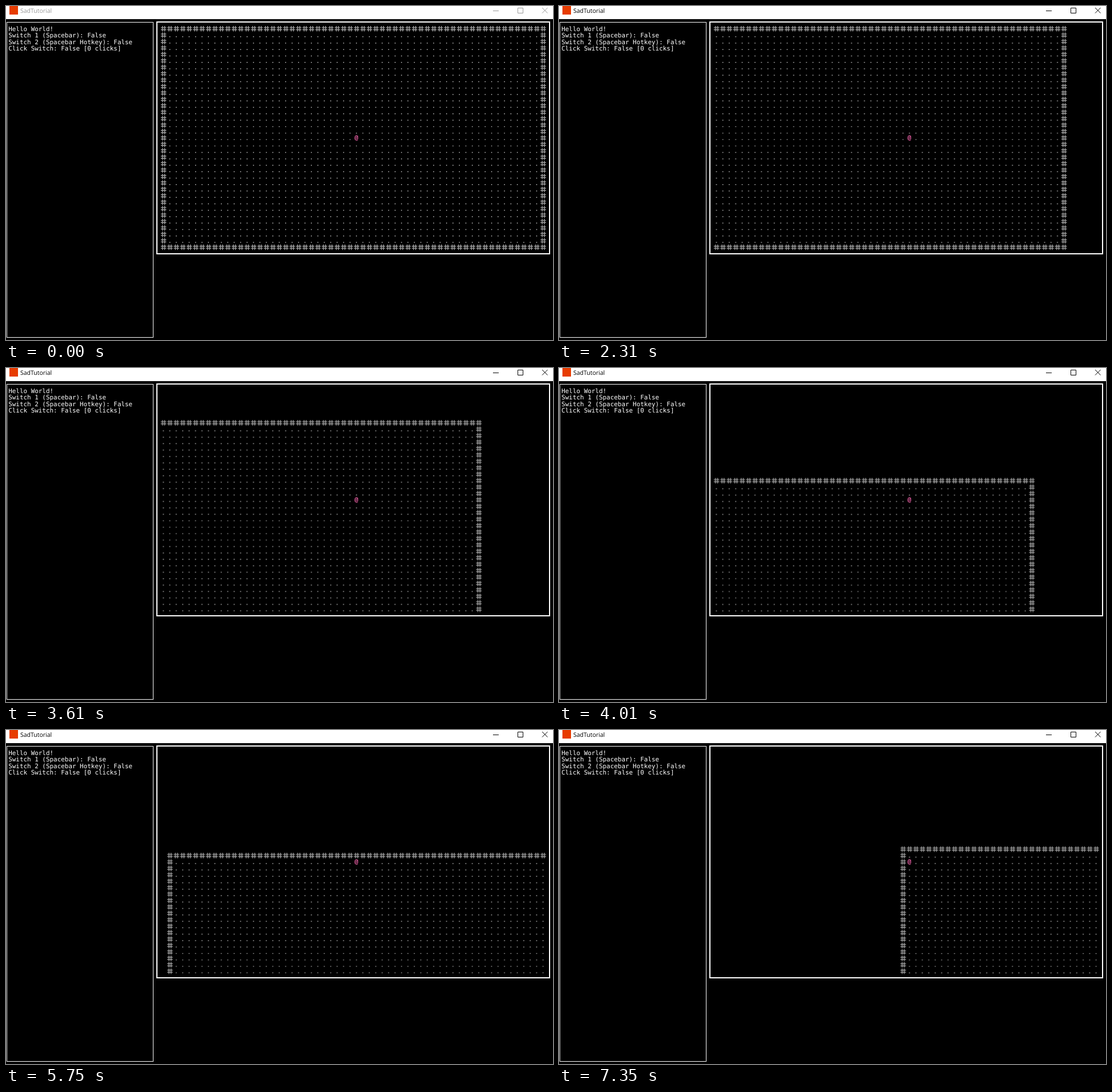
Recreate the animation shown at these times as an HTML page. Size 957 px wide and 585 px high, loop 8 s.

```html
<!DOCTYPE html>
<html lang="en">
<head>
<meta charset="utf-8">
<title>SadTutorial</title>
<style>
html, body { margin: 0; width: 100%; height: 100%; overflow: hidden; background: #000; }
svg { display: block; }
text { text-rendering: geometricPrecision; white-space: pre; }
.title { font: 10.5px "Open Sans", "Noto Sans", sans-serif; }
.log { font: 10.93px "DejaVu Sans Mono", monospace; fill: #fff; }
.hero { font: 0.95px "DejaVu Sans Mono", monospace; fill: #ff69b4; stroke: #ff69b4; stroke-width: 0.02; text-anchor: middle; }
.bar { color: #000; animation: focus 8s step-end infinite; }
#map { animation: walk 8s step-end infinite; }

@keyframes focus {
  0% { color: #999; }
  2.375%, 100% { color: #000; }
}

/* one unit is one cell; held keys repeat every 50 ms after 0.8 s */
@keyframes walk {
  0% { transform: translate(0, 0); }
  17.375% { transform: translate(-1px, 0); }
  27.625% { transform: translate(-3px, 0); animation-timing-function: steps(3); }
  31.375% { transform: translate(-9px, 0); }
  32.625% { transform: translate(-10px, 0); }
  33.875% { transform: translate(-10px, 1px); }
  43.875% { transform: translate(-10px, 3px); animation-timing-function: steps(2); }
  46.375% { transform: translate(-10px, 7px); }
  47.625% { transform: translate(-10px, 10px); animation-timing-function: steps(2); }
  50.125% { transform: translate(-10px, 14px); }
  51.625% { transform: translate(-10px, 16px); }
  56.625% { transform: translate(-9px, 16px); }
  66.625% { transform: translate(-7px, 16px); animation-timing-function: steps(3); }
  70.375% { transform: translate(-1px, 16px); }
  71.875% { transform: translate(1px, 16px); animation-timing-function: steps(14); }
  89.375% { transform: translate(29px, 16px); }
  91.875%, 100% { transform: translate(29px, 15px); }
}
</style>
</head>
<body>
<svg width="957" height="585" viewBox="0 0 957 585">
  <rect width="957" height="585"/>
  <rect width="957" height="23" fill="#fff"/>
  <rect x="6" y="0" width="15" height="15" fill="#e73c00"/>
  <g class="bar">
    <text class="title" x="25" y="12" fill="currentColor">SadTutorial</text>
    <path d="M852 8.5h10M895.5 3.5h9v9h-9zM938 3l9.5 9.5M947.5 3l-9.5 9.5" fill="none" stroke="currentColor"/>
  </g>

  <rect x="1.5" y="28.5" width="256" height="552" fill="none" stroke="#fff"/>
  <g class="log">
    <text x="4.2" y="44">Hello World!</text>
    <text x="4.2" y="55.3">Switch 1 (Spacebar): False</text>
    <text x="4.2" y="66.5">Switch 2 (Spacebar Hotkey): False</text>
    <text x="4.2" y="77.8">Click Switch: False [0 clicks]</text>
  </g>

  <rect x="264" y="28" width="687" height="406" fill="none" stroke="#fff" stroke-width="2"/>
  <svg x="270.2" y="34.2" width="675.54" height="394.07" viewBox="0 0 60 35">
    <g id="map" fill="none">
      <path id="floor" stroke="#c8c8c8" stroke-width="0.13"/>
      <path id="wall" stroke="#a0a0a0" stroke-width="0.13"/>
    </g>
    <rect x="30" y="17" width="1" height="1"/>
    <text class="hero" x="30.46" y="17.79">@</text>
  </svg>
</svg>
<script>
const COLS = 60, ROWS = 35;
const dot = (x, y) => `M${x + 0.39} ${y + 0.73}h.13`;
const hash = (x, y) =>
  `M${x + 0.06} ${y + 0.32}h.84M${x + 0.06} ${y + 0.65}h.84` +
  `M${x + 0.32} ${y + 0.06}v.84M${x + 0.65} ${y + 0.06}v.84`;

let floor = "", wall = "";
for (let y = 0; y < ROWS; y++) {
  for (let x = 0; x < COLS; x++) {
    const edge = x === 0 || y === 0 || x === COLS - 1 || y === ROWS - 1;
    if (edge) wall += hash(x, y);
    else floor += dot(x, y);
  }
}
document.getElementById("floor").setAttribute("d", floor);
document.getElementById("wall").setAttribute("d", wall);
</script>
</body>
</html>
```
